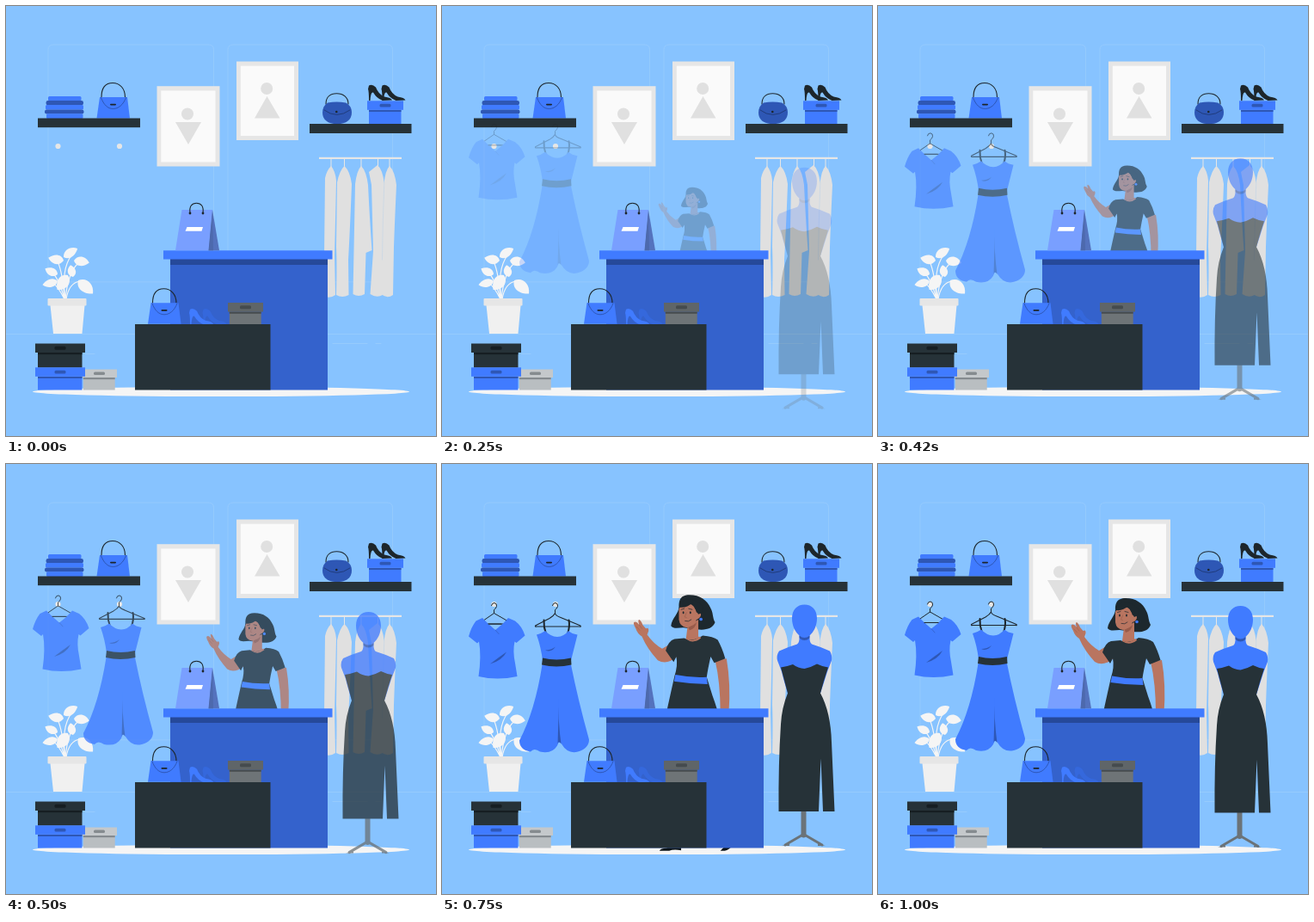
An HTML page for the animation above (1040 ms loop, 500x500 px).

```html
<!DOCTYPE html>
<html lang="en">
<head>
<meta charset="utf-8">
<title>Clothing shop</title>
<style>
  html, body { margin: 0; width: 100%; height: 100%; overflow: hidden; background: #87c3ff; }
  svg { display: block; width: 100vw; height: 100vh; }
</style>
</head>
<body>
<svg id="stage" viewBox="0 0 500 500"></svg>
<script>
const BLUE = '#407bff', NAVY = '#2e57b5', DARK = '#263238', SKIN = '#b97560';
const PALE = '#e0e0e0', MIST = '#e6e6e6', SNOW = '#f5f5f5';

const rect = (x1, y1, x2, y2, fill, rx = 0) =>
  `<rect x="${x1}" y="${y1}" width="${x2 - x1}" height="${y2 - y1}" rx="${rx}" fill="${fill}"/>`;
const shape = (d, fill) => `<path d="${d}" fill="${fill}"/>`;
const line = (d, stroke, width = 1) =>
  `<path d="${d}" fill="none" stroke="${stroke}" stroke-width="${width}" stroke-linecap="round" stroke-linejoin="round"/>`;
const oval = (x, y, rx, ry, fill) => `<ellipse cx="${x}" cy="${y}" rx="${rx}" ry="${ry}" fill="${fill}"/>`;
const at = (x, y, content, extra = '') => `<g transform="translate(${x} ${y}) ${extra}">${content}</g>`;

// Box with a lid; inset is how far the body sits inside the lid.
const box = (x, y, w, h, lid, inset, [top, body, shade]) =>
  rect(x + inset, y + lid, x + w - inset - .5, y + h, body) +
  rect(x + inset, y + lid, x + w - inset - .5, y + lid + 2.2, shade) +
  rect(x, y, x + w, y + lid, top) +
  rect(x + w / 2 - 6.5, y + lid * .32, x + w / 2 + 6.5, y + lid * .68, shade, 1.5);

const handbag =
  line('M5.5 17C5.5 6 10 .5 18.5 .5S33 7 33 17', '#1d262b', 1.1) +
  shape('M3.5 17H35.5L38.5 41.5H0Z', BLUE) +
  line('M5 17.5C8 26 13 30.5 19 30.5S31 26 34 17.5', NAVY, 1) +
  rect(15.5, 24.8, 22.5, 26.4, '#1d262b', .8);

const heel = fill =>
  shape('M1 1Q5 -1 9 3Q12 11 19 14Q27 15 28 18L17 18.5Q10 16 6 9Q3 8 2.5 18.5L1 18.5Q1 8 0 5Z', fill);
const heels = (x, y, back, front) => at(x, y, at(15.5, 0, heel(back)) + heel(front));

const poster = (x1, y1, x2, y2, cx, cy, triangle) =>
  rect(x1, y1, x2, y2, MIST) + rect(x1 + 4.8, y1 + 5.2, x2 - 5, y2 - 5, '#fafafa') +
  oval(cx, cy, 7, 7, PALE) + shape(triangle, PALE);

const leaf = (x, y, angle, length, width) =>
  at(x, y, shape(`M0 0C${length * .2} ${-width} ${length * .7} ${-width} ${length} 0C${length * .7} ${width * .8} ${length * .2} ${width} 0 0Z`, SNOW), `rotate(${angle})`);

const room =
  line('M49 320.5V51Q49 45 55 45H235.500Q241.500 45 241.500 51V320.500Z', '#99ccfd', .8) +
  line('M258 320.500V51Q258 45 264 45H443.500Q449.500 45 449.500 51V320.500Z', '#99ccfd', .8) +
  line('M0 381.500H500M380 392.500H420M430 392.500H436M92 404.500H103', '#9bcdfd', .8) +
  oval(250, 448.5, 219, 5.6, SNOW) +
  poster(175.500, 93.2, 248.500, 186.5, 211, 125.5, 'M197 135H227L212 161Z') +
  poster(268, 64.500, 340, 156, 303.2, 96, 'M303.500 105L289 130.500H318.500Z') +
  oval(60.500, 163, 3.1, 3.1, MIST) + oval(132, 163, 3.1, 3.1, MIST);

const leftShelf =
  rect(49, 105, 87.5, 110.2, BLUE, 1.5) + rect(46.5, 110, 90, 115.2, NAVY, 2.3) +
  rect(46, 115, 90, 120.6, BLUE, 1.5) + rect(45, 120.4, 90.5, 125.6, NAVY, 2.3) +
  rect(47, 125.3, 89.5, 131, BLUE, 1.5) +
  at(105.5, 89, handbag) + rect(37, 130.500, 156, 141.2, DARK);

const BLUE_BOX = [BLUE, BLUE, NAVY];
const rightShelf =
  line('M372 114C372 106 377 101.800 384.500 101.800S398 106 398 114', '#1d262b', 1.1) +
  shape('M374 112.500Q384.500 110.500 395 112.500C400 115 402 119 402 124C402 132 396 137.200 385 137.200S368 132 368 124C368 119 370 115 374 112.500Z', NAVY) +
  line('M370 121Q384.500 132 400 121', '#203c7d', 1) + oval(384.300, 123, 1.3, 1.3, '#1d262b') +
  box(420, 110.300, 42, 27, 10.5, 2, BLUE_BOX) +
  heels(421, 91.5, '#1d262b', '#1d262b') + rect(353, 137, 471.5, 148, DARK);

const rack =
  line('M378 177V190M393.500 177V190M413 177V190M432.500 177V190M446 177V190', MIST, 1) +
  rect(364, 175.800, 460, 178, MIST) +
  shape('M378 186Q383 192 384 203Q383 250 382 290L383 336Q376 341 369.500 337L371 200Q373 191 378 186Z', PALE) +
  shape('M393.500 186Q400 192 402 207Q400 260 398 295L398.500 336Q391 340 384 336Q385 300 384 280L385 205Q388 191 393.500 186Z', PALE) +
  shape('M413 186Q419 192 421 208Q423 250 425.500 284L418.500 287L417 335Q410 339 403.500 335L406 207Q408 191 413 186Z', PALE) +
  shape('M432 185Q438 190 440 207L438 336Q431 340 423.500 335L427 285L425 208L422 193Z', PALE) +
  shape('M446 186Q452 192 454 208Q452 250 451 280L450 336Q443 341 436.500 335L439.500 207Q441 191 446 186Z', PALE) +
  line('M439.800 205Q438 250 437.500 295', '#c6d6e6', .7);

const plant =
  line('M69 341Q64 306 76 290M69 341Q72 310 84 299M68 341Q66 310 60 297M68 341Q62 318 54 310M68 341Q60 325 54 322M70 341Q73 322 86 320', SNOW, 1.2) +
  leaf(67, 292, -32, 19, 7) + leaf(79, 296, 8, 18, 7.5) + leaf(67, 296, 190, 18, 7.5) +
  leaf(60, 312, 205, 16, 6.5) + leaf(60, 320, 166, 18, 6.5) + leaf(72, 313, 126, 21, 9.5) +
  leaf(84, 319, 42, 23, 9.5) + leaf(78, 315, -102, 14, 6.5) +
  shape('M51.500 348H91.500L88.500 381H55Z', '#f0f0f0') + rect(48.500, 340, 93.500, 348.500, MIST, 1);

const floorBoxes =
  box(88, 422.500, 41, 24, 9.5, 1.8, ['#c4c8cb', '#b9bec1', '#858b8f']) +
  box(34, 392.500, 58, 28, 10.5, 3, [DARK, DARK, '#161e22']) +
  box(34, 420.300, 58, 26.2, 10.5, 3, BLUE_BOX);

const counter =
  rect(191, 294, 374, 446.500, '#3462cc') + rect(191, 294, 374, 301, '#26499a') +
  rect(183, 284.300, 379.500, 294.500, BLUE) +
  shape('M240 237L248 284.300H235.500Z', '#5472bd') + shape('M204.500 237H240L235.500 284.300H197Z', '#799fff') +
  shape('M240 237L241 284.300H235.500Z', '#4d69ad') +
  line('M214 240.500C213 233 216 229.200 221.500 229.200S230 233 229 240.500', '#1d262b', 1.1) +
  oval(214, 241, 1.4, 1.4, '#1d262b') + oval(229, 241, 1.4, 1.4, '#1d262b') +
  shape('M210.500 257H229L227.500 261.700H208.500Z', '#fff') +
  at(165, 328.300, handbag) + heels(213, 351.7, '#3568dc', BLUE) +
  box(258, 345, 41, 25.5, 10.5, 1.8, ['#5f6568', '#6e7477', '#454b4e']) +
  rect(150, 370, 307.500, 446.500, DARK);

const hook = x => line(`M${x - 3} 163Q${x - 2.5} 160 ${x + .5} 160Q${x + 3.5} 160.500 ${x + 3} 164Q${x + 2} 167 ${x} 168V172`, '#1d262b', 1);

const shirt =
  hook(60.500) + line('M60.500 172L46 182M60.500 172L78 182M50 184.500H72', '#1d262b', 1) +
  shape('M47 177.500Q53 184 62 191.500Q71 185 77 177.500L85 181Q93 187 96.500 198L86.500 206.500L84.500 205Q82 216 85 230L87.500 245.500Q64 250.500 42.500 245.500Q46 222 43 205L41 207L31 199Q34 188 39.500 181Z', BLUE) +
  line('M54 184.500H69', '#1d262b', 1) + line('M62 191.500L66 196', NAVY, .6) +
  shape('M75 217Q70 227 56 231Q65 224 75 217Z', NAVY);

const dress =
  hook(131.500) + line('M131.500 172Q130 175 125 178L108.500 186.500Q108 188 110 187.500H160Q162 188 161 186.500L138 177Q132 175 131.500 172', '#1d262b', 1.1) +
  line('M118.500 180Q118 188 121 196M147.500 180Q149 187 146 196', '#1d262b', 2) +
  shape('M110 197Q115 196 120 192.500Q126 199 134 199.500Q142 199 147 192.500Q151 196 157.500 197Q154 211 150 227H117Q115 211 110 197Z', BLUE) +
  shape('M120 215Q127 218 132 211Q127 215 120 215Z', NAVY) +
  shape('M116.500 232H150Q158 272 171 319Q171 329 158 333Q146 336 139 324Q136 319 134 326Q128 336 114 333Q107 328 103 333Q90 331 90 320Q108 286 116.500 232Z', BLUE) +
  shape('M117 224Q133 228 150 224L150.500 232Q133 236 116 232Z', DARK) +
  shape('M135 263Q135 300 138.500 324Q135 319 134.500 325Q136 295 135 263Z', NAVY);

const mannequin =
  line('M420.500 400V433', '#6b7378', 6) + line('M420.500 432L399 444.500M420.500 432L442 444.500', '#6b7378', 3) +
  shape('M395 445.500L404 443.500L404 445.500ZM446 445.500L437 443.500V445.500Z', '#6b7378') +
  shape('M421.500 165C430 165 436 171 436 181C436 190 432 197 427.500 201Q427 209 430 211Q440 214 451 219Q454 224 453 230L448 243Q444 256 440 268H402Q397 252 395 243L390 230Q388.500 224 392 219Q403 214 413 211Q416 209 415.500 201C411 197 407 190 407 181C407 171 413 165 421.500 165Z', BLUE) +
  shape('M415.500 201Q421.500 206 427.500 201L427.300 204Q421.500 209 415.700 204Z', NAVY) +
  shape('M394 238Q401 237 408 234.500Q414 239 421.500 239.500Q429 238 436 234Q442 237 449 238Q444 253 440 268Q452 290 453 325L456.500 405.500H443L440.500 344L438 405.500H391.500Q391 350 394 304Q395 285 402 268Q398 253 394 238Z', DARK);

const woman =
  shape('M254 446Q255 443.500 262 443L270 439H278.500V445.500Q270 444 265 446Z', '#0d1418') + shape('M323 446L328 441H336Q333 445 328 446Z', '#0d1418') +
  shape('M317 230L330 228Q335 257 332.500 290H323Q323 255 317 230Z', SKIN) +
  shape('M267 211L274 226Q262 236 252 230Q240 217 234 203Q229 200 227 194Q224 189 225 187Q228 185 231 190Q229 184 231 184Q233 185 235 190L238.500 194Q242 192 241.500 197L240 201Q247 211 257 217Z', SKIN) +
  line('M231 190L234 194M228 192L231.500 196', '#985b4a', .5) +
  shape('M288 156C277 156 276 163 276 169C276 177 268 182 267 191C270 195 276 193 281 193L296 195C306 196 314 195 317 187C314 182 315 176 312 171C308 162 300 156 288 156Z', '#1d282e') +
  shape('M286 190L298 184V203Q304 207 301 210Q292 216 284 206Z', SKIN) +
  shape('M286 191Q292 192 296 187Q295 194 288 196Z', '#985b4a') +
  shape('M276 172Q278 167 287 166Q294 167 296 176Q300 174 301 178Q301 182 296 184Q292 192 285 193Q277 192 276 184Z', SKIN) +
  shape('M277 170Q285 171 291 165Q294 172 298 178Q304 176 303 169Q295 160 284 161Q276 164 277 170Z', '#1d282e') +
  oval(281, 176, .9, 1.5, '#1d282e') + oval(289, 176, .9, 1.5, '#1d282e') +
  line('M278.500 172.500L282 171.500M287 171.500L291 172.500', '#1d282e', .7) +
  line('M284.500 176L282.500 181L284.500 181.500', '#985b4a', .6) + line('M283 185.500Q287 187 290 184', '#1d282e', .7) +
  oval(301, 183.500, 1.8, 1.8, BLUE) +
  shape('M282 205Q291 210 303 202Q315 203 320 207Q325 216 328.500 228L316 233L312 226Q309 239 307.500 249L314 270Q317 278 319 285L325 312H257L263 284Q268 261 271 248Q275 236 273 226L270 232L261 219Q264 208 271 206Z', DARK) +
  shape('M284 205Q291 210 300 203L301 205Q292 212 284 206Z', SKIN) +
  shape('M272 246.500Q289 250 307.500 249L308.500 257Q289 257 270.500 254Z', BLUE);

const stage = document.getElementById('stage');
stage.innerHTML = room + leftShelf + rightShelf + rack + plant +
  `<g id="clothes">${shirt + dress}</g><g id="woman">${woman}</g>` +
  floorBoxes + counter + `<g id="mannequin">${mannequin}</g>`;
const [clothesEl, womanEl, mannequinEl] =
  ['clothes', 'woman', 'mannequin'].map(id => document.getElementById(id));

const LOOP = 1040, FPS = 24;
const bezier = (u, a, b) => 3 * (1 - u) ** 2 * u * a + 3 * (1 - u) * u * u * b + u ** 3;

function ease(progress) {
  let low = 0, high = 1;
  for (let i = 0; i < 24; i++) {
    const mid = (low + high) / 2;
    if (bezier(mid, .36, .5) < progress) low = mid; else high = mid;
  }
  return bezier(low, -.01, 1.38);
}

function render(ms) {
  // Steps run at 24 per second, with starts rounded down to 10 ms.
  const step = Math.floor((Math.floor(ms / 10) * 10 + 9.9) * FPS / 1000);
  const e = step < 2 ? 0 : ease(Math.min(1, step / FPS + .01));
  const opacity = Math.max(0, Math.min(1, e));
  for (const el of [clothesEl, womanEl, mannequinEl]) el.setAttribute('opacity', opacity);
  clothesEl.setAttribute('transform', `translate(0 ${30 * (e - 1)})`);
  mannequinEl.setAttribute('transform', `translate(0 ${30 * (1 - e)})`);
  womanEl.setAttribute('transform', `translate(296 301) scale(${.5 + e / 2}) translate(-296 -301)`);
}

const start = performance.now();
function tick() {
  render((performance.now() - start) % LOOP);
  requestAnimationFrame(tick);
}
tick();
</script>
</body>
</html>
```
